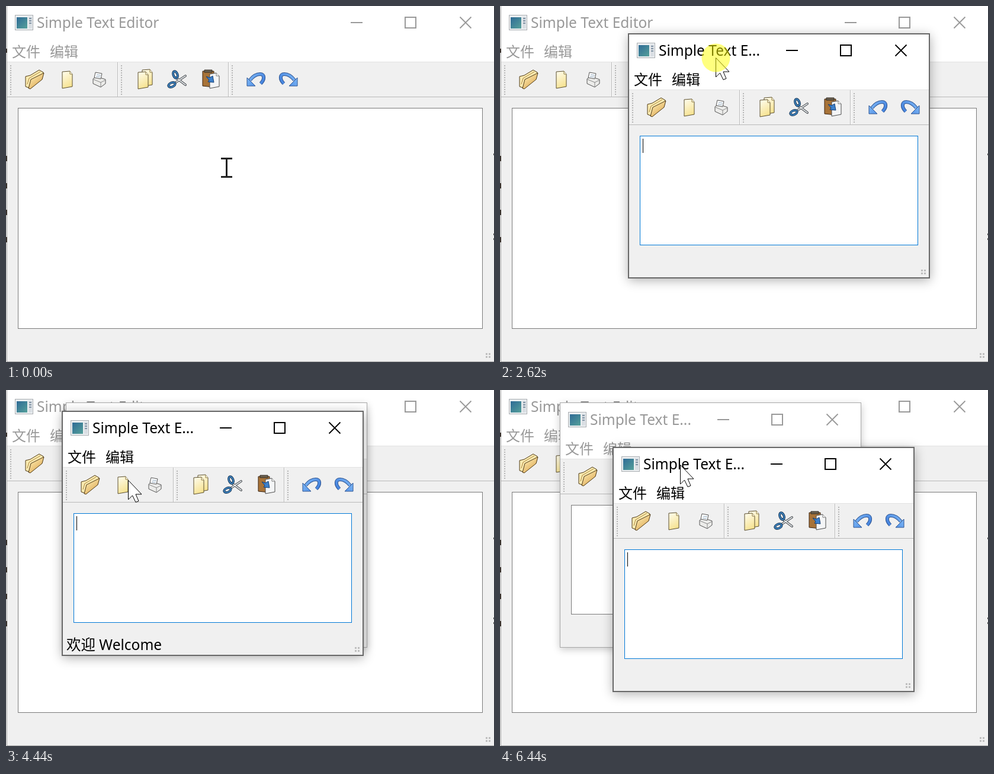
Recreate the animation shown at these times as an HTML page with a canvas. Size 824 px wide and 601 px high, loop 6.64 s.

```html
<!DOCTYPE html>
<html lang="zh">
<head>
<meta charset="utf-8">
<title>Simple Text Editor</title>
<style>
html, body { margin: 0; width: 100%; height: 100%; overflow: hidden; background: #fff; }
canvas { display: block; }
</style>
</head>
<body>
<canvas id="stage" width="824" height="601"></canvas>
<script>
const c = document.getElementById('stage').getContext('2d');
const LOOP = 6640, STEP = 201.2;
const HINT = '新建一个文件', WELCOME = '欢迎 Welcome';

// Turning points as [step, x, y], linear in between.
const pointer = [[0, 373, 273], [4, 116, 123], [8, 116, 123], [12, 239, 80], [13, 365, 88], [14, 396, 86],
  [17, 249, 63], [19, 207, 153], [22, 207, 153], [24, 209, 66], [25, 223, 75], [27, 419, 136], [29, 305, 127]];
const secondDrag = [[24, 94, 36], [25, 97, 40], [27, 302, 106], [29, 190, 97]];

const within = (n, a, b) => n >= a && n <= b;
const clamp = (n, a, b) => Math.max(a, Math.min(b, n));

function at(keys, n) {
  n = clamp(n, keys[0][0], keys[keys.length - 1][0]);
  const i = Math.max(1, keys.findIndex(k => k[0] >= n));
  const [t0, x0, y0] = keys[i - 1], [t1, x1, y1] = keys[i];
  const p = (n - t0) / (t1 - t0);
  return [Math.round(x0 + (x1 - x0) * p), Math.round(y0 + (y1 - y0) * p)];
}

// While dragged, the first window hangs from the pointer.
function firstPlace(n) {
  const [x, y] = at(pointer, clamp(n, 12, 17));
  return [x - 149, y - 41];
}

function box(x, y, w, h, color) {
  c.fillStyle = color;
  c.fillRect(x, y, w, h);
}

function frame(x, y, w, h, color, width = 1) {
  c.strokeStyle = color;
  c.lineWidth = width;
  c.strokeRect(x, y, w, h);
}

function text(s, x, y, color, size = 24) {
  c.font = `${size}px "Noto Sans", "Noto Sans CJK SC", "Noto Sans CJK", sans-serif`;
  c.fillStyle = color;
  c.fillText(s, x, y);
}

function shape(d, fill, stroke, width = 1) {
  const p = new Path2D(d);
  if (fill) { c.fillStyle = fill; c.fill(p); }
  if (stroke) { c.strokeStyle = stroke; c.lineWidth = width; c.stroke(p); }
}

// A coloured line with a darker rim.
function rimmed(d, rim, color, width) {
  shape(d, null, rim, width + 2);
  shape(d, null, color, width);
}

function fade(x0, y0, x1, y1, a, b) {
  const g = c.createLinearGradient(x0, y0, x1, y1);
  g.addColorStop(0, a);
  g.addColorStop(1, b);
  return g;
}

function placed(x, y, draw, flip = 1) {
  c.save();
  c.translate(x, y);
  c.scale(flip, 1);
  draw();
  c.restore();
}

function appIcon() {
  box(15, 15, 31, 26, '#a9adb1');
  box(16, 16, 29, 24, '#eceff1');
  box(18, 19, 18, 19, fade(18, 19, 36, 38, '#2f6b96', '#55a09a'));
  box(38, 18, 6, 20, '#d9dee3');
  for (let y = 20; y < 32; y += 4) box(39, y, 4, 2, '#8395a6');
}

// Icons are drawn around their own centre.
function page() {
  shape('M-8-13L5-14 9-9V12L-8 15Z', fade(-8, -14, 9, 14, '#fffdf0', '#f5df85'), '#5c5030');
  shape('M5-14V-9H9', '#fffbe6', '#8b7940');
}

function copy() {
  placed(3, -3, page);
  placed(-4, 1, page);
}

function folder() {
  shape('M-15-5L-7-7 8-16 15-12 13-2-7 15-15 12Z', '#fbeab0', '#4f3a16');
  shape('M-12 8L-9-2 10-13', null, '#a8853f');
  shape('M-10 15L-6 0 16-11 13 0-7 16Z', fade(-6, -8, 10, 12, '#fdebb0', '#dfad5b'), '#4f3a16');
}

function printer() {
  shape('M-10-1L-4-5 11 0V7L3 13-10 7Z', '#ececea', '#555');
  shape('M-6-12L5-10 3-1-8-3Z', '#fff', '#555');
  shape('M-4-8L3-7M-5-5L2-4', null, '#8ba5bb');
  shape('M-9 0L3 5 11 1M3 5V12', null, '#888');
}

function scissors() {
  c.lineCap = 'round';
  rimmed('M-4 6L14-6M-2-3L14 9', '#3d4146', '#e4e8ea', 1.8);
  for (const [x, y, turn] of [[-9, 9, -.4], [-3, -8, 1.2]]) {
    c.beginPath();
    c.ellipse(x, y, 6, 3.5, turn, 0, 7);
    frameStroke('#173554', 4);
    frameStroke('#3e83bf', 2);
  }
  c.lineCap = 'butt';
}

function frameStroke(color, width) {
  c.strokeStyle = color;
  c.lineWidth = width;
  c.stroke();
}

function paste() {
  shape('M-14-14H5V13L-14 11Z', '#a87338', '#3b2513');
  shape('M-11-12V-16H2V-12Z', '#6c6150', '#302a22');
  shape('M-2-9L9-11 14-6V12L-2 15Z', '#f4f5f6', '#4d4d4d');
  shape('M9-11V-6H14', '#fff', '#777');
  shape('M-8-5L-2-3 3-6 5 5-5 4-3 1Z', '#3c80cb', '#173f74');
}

function undo() {
  const d = 'M-10 1Q-2-9 7-9C15-9 15 0 8 7', blue = fade(-15, -12, 14, 8, '#86c0fb', '#3f7edc');
  rimmed(d, '#2f5592', blue, 4);
  shape('M-15-3L-1 11H-15Z', blue, '#2f5592');
}

const redo = () => placed(0, 0, undo, -1);
const icons = [[48, folder], [103, page], [157, printer], [235, copy], [289, scissors], [346, paste], [422, undo], [477, redo]];

function toolbar(w, hover) {
  box(2, 94, w, 60, '#f0f0f0');
  box(2, 94, w, 1, '#e2e2e2');
  box(2, 153, w, 1, '#b9b9b9');
  for (const x of [8, 195, 382]) {
    for (let y = 100; y < 151; y += 4) box(x - 1, y, 2, 2, '#b6b6b6');
    if (x > 8) {
      box(x - 7, 95, 1, 58, '#b9b9b9');
      box(x - 6, 95, 1, 58, '#fff');
    }
  }
  if (hover) {
    box(76, 97, 55, 53, '#bcdcf4');
    frame(76.5, 97.5, 54, 52, '#90c8f6');
  }
  for (const [x, icon] of icons) placed(x, 124, icon);
}

function editor([x, y], w, h, { active, hover, caret, status }) {
  const ink = active ? '#000' : '#999';
  c.save();
  c.translate(x, y);
  c.save();
  c.shadowColor = `rgba(0,0,0,${active ? .32 : .22})`;
  c.shadowBlur = active ? 18 : 12;
  c.shadowOffsetY = 3;
  box(1, 0, w - 1, h, '#f0f0f0');
  c.restore();

  c.beginPath();
  c.rect(0, -1, w, h + 1);
  c.clip();
  box(1, 0, w, 94, '#fff');
  appIcon();
  text(w > 600 ? 'Simple Text Editor' : 'Simple Text E...', 52, 36.5, ink, 24.5);
  box(w - 243, 27, 20, 2, ink);
  frame(w - 151, 19, 18, 18, ink, 2);
  shape(`M${w - 58.5} 18.5l19 19m0 -19l-19 19`, null, ink, 1.8);
  text('文件', 10, 86, ink);
  text('编辑', 74, 86, ink);
  toolbar(w, hover);

  box(20, 172, w - 40, h - 228, '#fff');
  frame(20.5, 172.5, w - 41, h - 229, active ? '#0078d7' : '#7a7a7a');
  if (caret) box(25, 177, 1, 24, '#000');
  if (status) text(status, 8, h - 10, '#000', status === WELCOME ? 24.5 : 24);
  for (const dx of [15, 10]) for (const dy of [15, 10]) box(w - dx, h - dy, 3, 3, '#bebebe');
  if (active) frame(1, 0, w - 2, h - 1, '#686868', 2);
  else frame(1.5, -.5, w - 2, h, '#a8a8a8');
  c.restore();
}

// Slivers of the page behind the large window.
function slivers() {
  box(0, 72, 2, 7, '#3b332e');
  for (let y = 253; y < 400; y += 45.5) box(0, Math.round(y), 2, 9, '#3b332e');
  for (const y of [249, 384, 392]) box(823, y, 1, 3, '#444');
}

function cursor(n) {
  const pressed = within(n, 5, 6) || within(n, 12, 17) || n === 20 || within(n, 24, 29);
  placed(...at(pointer, n), () => {
    if (n < 3) {
      for (const y of [-17, 14]) box(-10, y, 19, 3, '#222');
      box(-2, -17, 3, 34, '#222');
    } else {
      shape('M-.5-.5V32L6.5 25 12 36.5 17 34.5 12 23H22Z', '#fff', '#000');
    }
    if (pressed) {
      c.beginPath();
      c.arc(-.5, -.5, 24, 0, 7);
      c.fillStyle = 'rgba(255,255,0,.5)';
      c.fill();
    }
  });
}

function draw(t) {
  const n = Math.min(32, Math.floor((t + 20) / STEP));
  const blink = start => (t - start) % 1060 < 530;
  const overNew = within(n, 4, 6);
  box(0, 0, 824, 601, '#fff');
  editor([0, 0], 825, 601, { active: within(n, 5, 6), hover: overNew, status: overNew && HINT });
  slivers();
  if (n >= 7) {
    const hover = within(n, 19, 21);
    editor(firstPlace(n), 510, 413, {
      active: n < 22, hover, caret: n < 19 && blink(1390), status: hover ? HINT : n < 10 && WELCOME
    });
  }
  if (n >= 22) {
    editor(at(secondDrag, n), 510, 413, { active: true, caret: blink(4320), status: n < 24 && WELCOME });
  }
  cursor(n);
}

const start = performance.now();
function tick() {
  draw((performance.now() - start) % LOOP);
  requestAnimationFrame(tick);
}
tick();
</script>
</body>
</html>
```
